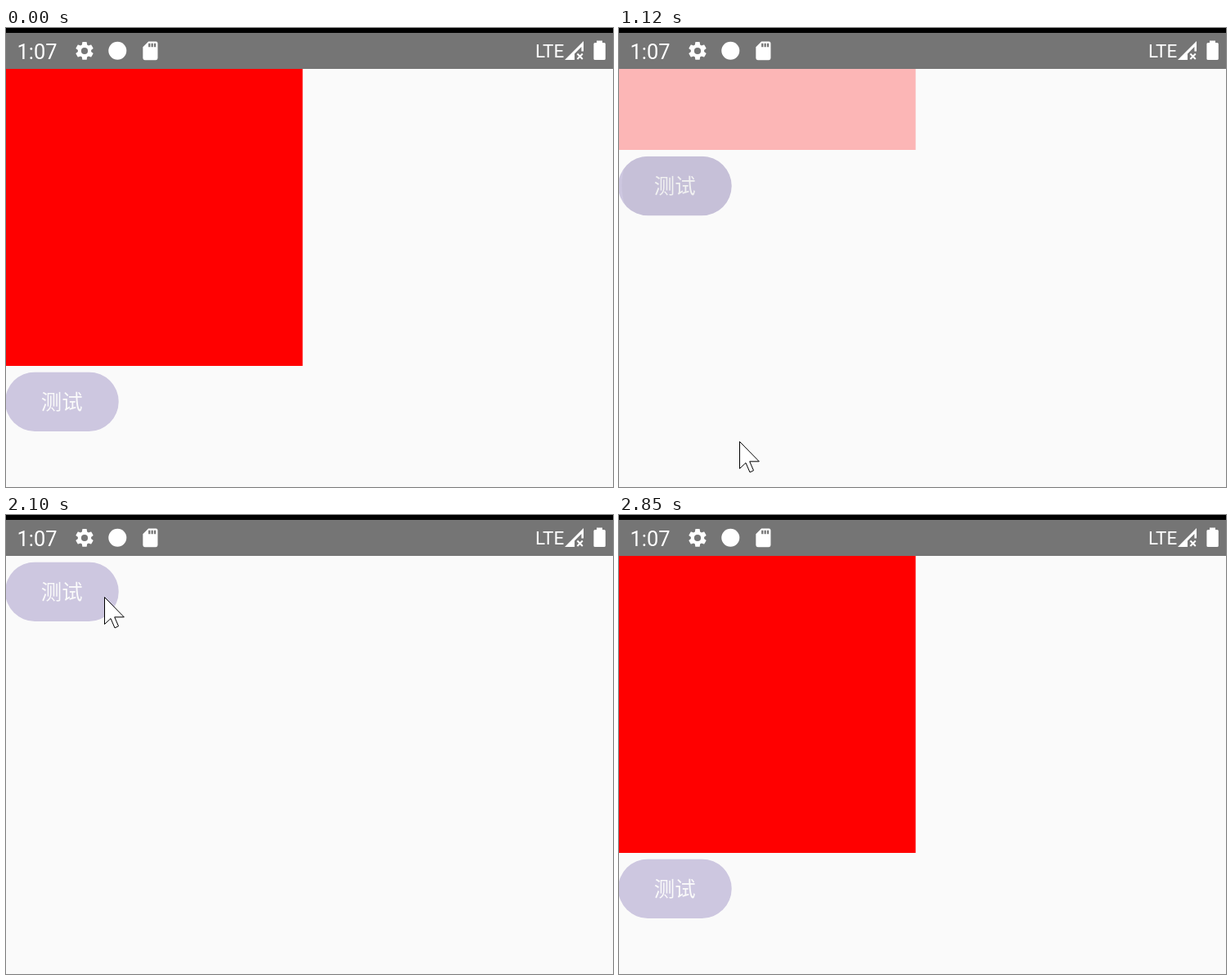
Recreate the animation shown at these times as an HTML page. Size 742 by 561 pixels, loop 3.7 s.

```html
<!DOCTYPE html>
<html lang="zh">
<head>
<meta charset="utf-8">
<title>Expand and collapse</title>
<style>
  html, body { margin: 0; width: 100%; height: 100%; overflow: hidden; background: #fafafa; }
  svg { display: block; width: 742px; height: 561px; }
  .bar { font-family: Roboto, sans-serif; fill: #fff; }
  .label { font: 25.4px "Noto Sans CJK SC", "Noto Sans CJK", sans-serif; fill: #fafafa; }
</style>
</head>
<body>
<svg viewBox="0 0 742 561">
  <defs>
    <clipPath id="pill"><rect x="-1" width="138.7" height="72.5" rx="36.25"/></clipPath>
  </defs>
  <rect width="742" height="561" fill="#fafafa"/>
  <rect id="box" y="50" width="362.6" height="363" fill="#f00"/>
  <g id="button">
    <g clip-path="url(#pill)">
      <rect x="-1" width="139" height="73" fill="#cdc7e0"/>
    </g>
    <text class="label" x="42.8" y="45.6">测试</text>
    <g clip-path="url(#pill)"><circle id="ripple"/></g>
  </g>

  <rect width="742" height="50" fill="#757575"/>
  <rect width="742" height="6"/>
  <g class="bar">
    <text x="13.6" y="38" font-size="25.4">1:07</text>
    <path transform="translate(82.4 14.4) scale(1.133)" d="M19.14 12.94c.04-.3.06-.61.06-.94s-.02-.64-.07-.94l2.03-1.58c.18-.14.23-.41.12-.61l-1.92-3.32c-.12-.22-.37-.29-.59-.22l-2.39.96c-.5-.38-1.03-.7-1.62-.94l-.36-2.54c-.04-.24-.24-.41-.48-.41h-3.84c-.24 0-.43.17-.47.41l-.36 2.54c-.59.24-1.13.57-1.62.94l-2.39-.96c-.22-.08-.47 0-.59.22L2.74 8.87c-.12.21-.08.47.12.61l2.03 1.58c-.05.3-.09.63-.09.94s.02.64.07.94l-2.03 1.58c-.18.14-.23.41-.12.61l1.92 3.32c.12.22.37.29.59.22l2.39-.96c.5.38 1.03.7 1.62.94l.36 2.54c.05.24.24.41.48.41h3.84c.24 0 .44-.17.47-.41l.36-2.54c.59-.24 1.13-.56 1.62-.94l2.39.96c.22.08.47 0 .59-.22l1.92-3.32c.12-.22.07-.47-.12-.61zM12 15.6A3.6 3.6 0 1 1 12 8.4a3.6 3.6 0 0 1 0 7.2z"/>
    <circle cx="136.3" cy="27.8" r="11"/>
    <path transform="translate(162.8 14.2) scale(1.133)" d="M18 2h-8L4 8v12a2 2 0 0 0 2 2h12a2 2 0 0 0 2-2V4a2 2 0 0 0-2-2zm-6 6h-2V4h2zm3 0h-2V4h2zm3 0h-2V4h2z"/>
    <text x="647" y="35.5" font-size="22.5" font-stretch="75%">LTE</text>
    <path d="M683 39L706 16V28.5H703.4V23L695 31.4V39Z"/>
    <path d="M698.4 31.5L704.8 38M704.8 31.5L698.4 38" stroke="#fff" stroke-width="2"/>
    <path d="M722 18V15.5H729V18H731.2A1.6 1.6 0 0 1 732.8 19.6V37.4A1.6 1.6 0 0 1 731.2 39H720A1.6 1.6 0 0 1 718.4 37.4V19.6A1.6 1.6 0 0 1 720 18Z"/>
  </g>
  <path id="cursor" d="M.5 .5V33.5L8 26.5L13 38L17.5 35.8L12.7 24.8H24.3Z" fill="#fff" stroke="#000"/>
</svg>
<script>
const LOOP = 3700, HEIGHT = 363, HIDE = 990, SHOW = 2412;
const $ = id => document.getElementById(id);
const [box, button, ripple, cursor] = ['box', 'button', 'ripple', 'cursor'].map($);
const lerp = (a, b, p) => a + (b - a) * p;
const clamp = p => Math.min(1, Math.max(0, p));
const set = (el, attrs) => {
  for (const k in attrs) el.setAttribute(k, attrs[k]);
};

// Screen updates: first time, last time, count
const updates = [
  [0, 0, 1], [370, 570, 5], [940, 1040, 3], [1070, 1360, 7], [1400, 1450, 2], [1500, 2020, 12],
  [2070, 2100, 2], [2150, 2430, 5], [2480, 2480, 1], [2530, 2570, 2], [2620, 2850, 6]
].flatMap(([a, b, n]) => Array.from({ length: n }, (_, i) => n > 1 ? lerp(a, b, i / (n - 1)) : a));

// Pointer tip: time, x, y
const track = [
  [370, 131, 540], [420, 126, 505], [470, 118, 475], [520, 113, 459], [570, 116, 455],
  [940, 116, 455], [990, 135, 487], [1040, 147, 505], [1460, 147, 505],
  [1500, 147, 493], [1600, 146, 440], [1700, 140, 350], [1800, 133, 270], [1900, 127, 190],
  [2020, 122, 107], [2070, 120, 100], [2380, 120, 100], [2430, 165, 245],
  [2480, 219, 457], [2530, 228, 500], [2570, 230, 520], [2620, 230, 575]
];

// Presses: start time, x and y inside the button
const presses = [[970, 116, 35], [2300, 120, 43]];

// Critically damped spring, stiffness 400: distance left to travel
function spring(ms) {
  const u = Math.max(0, ms) * 0.02, left = (1 + u) * Math.exp(-u);
  return left < 0.002 ? 0 : left;
}

function placeCursor(t) {
  const i = track.findIndex(k => k[0] > t);
  if (i < 1) return set(cursor, { visibility: 'hidden' });
  const [a, b] = [track[i - 1], track[i]], p = (t - a[0]) / (b[0] - a[0]);
  const x = Math.round(lerp(a[1], b[1], p)), y = Math.round(lerp(a[2], b[2], p));
  set(cursor, { visibility: 'visible', transform: `translate(${x} ${y})` });
}

function placeRipple(t) {
  const press = presses.find(([s]) => t >= s && t < s + 375);
  if (!press) return set(ripple, { opacity: 0 });
  const [start, x, y] = press, age = t - start, p = clamp(age / 225);
  const grow = p * p * (3 - 2 * p);
  set(ripple, {
    cx: lerp(x, 68.5, p), cy: lerp(y, 36, p), r: lerp(41, 96, grow),
    opacity: 0.035 * clamp(age / 75) * clamp((375 - age) / 150)
  });
}

function draw(now) {
  const time = now % LOOP;
  const t = updates.findLast(u => u <= time);
  const open = t < 2000 ? spring(t - HIDE) : 1 - spring(t - SHOW);
  set(box, { height: Math.round(HEIGHT * open), opacity: open > 0.835 && t > SHOW ? 1 : open });
  set(button, { transform: `translate(0 ${57.4 + HEIGHT * open})` });
  placeRipple(t);
  placeCursor(t);
}

const begin = performance.now();
function tick() {
  draw(performance.now() - begin);
  requestAnimationFrame(tick);
}
tick();
</script>
</body>
</html>
```
